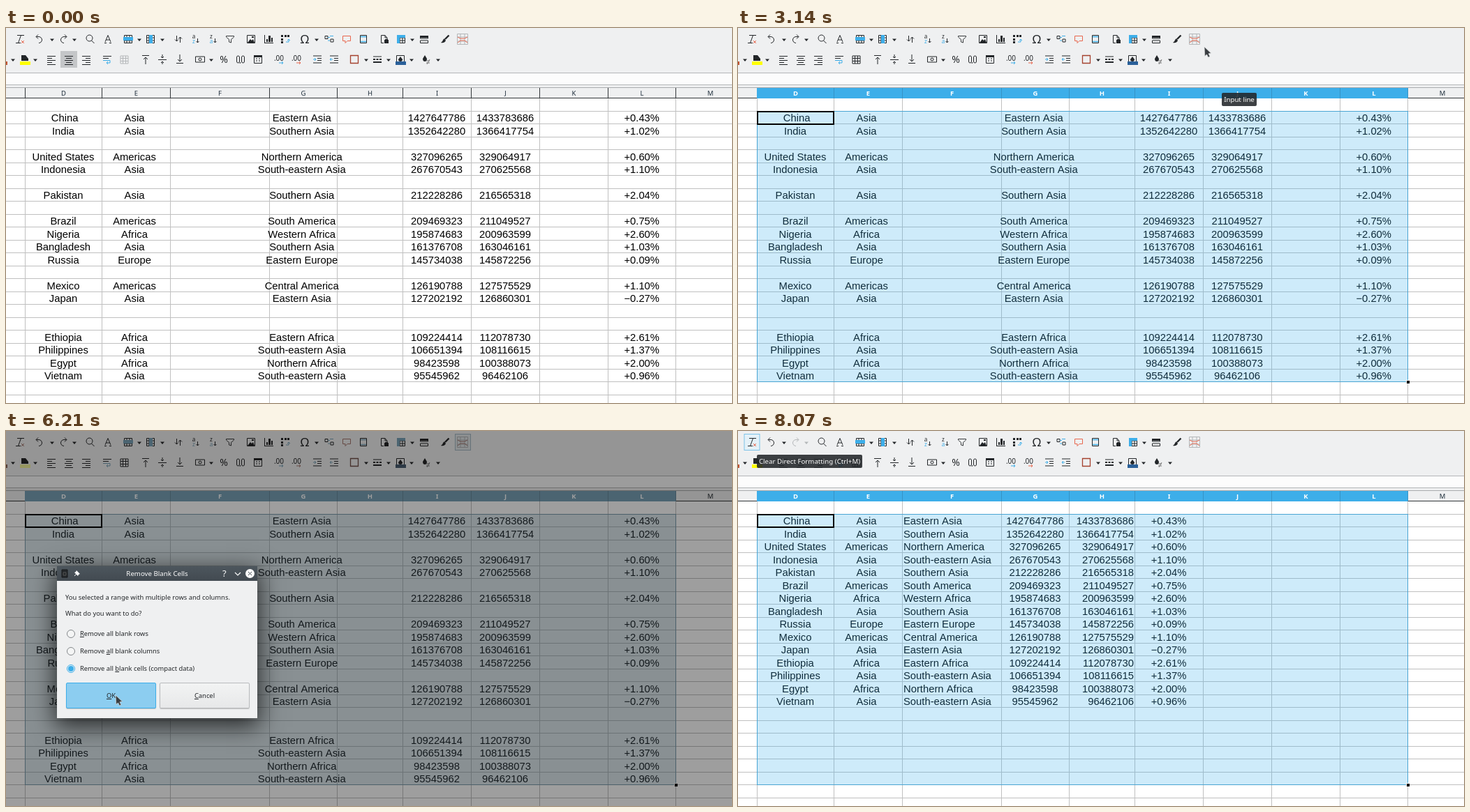
Recreate the animation shown at these times as an HTML page with a canvas. Size 1040x538 px, loop 8.14 s.

```html
<!DOCTYPE html>
<html lang="en">
<meta charset="utf-8">
<title>Remove blank cells</title>
<style>
  html, body { margin: 0; width: 100%; height: 100%; overflow: hidden; background: #fff; }
  body { position: relative; font: 9.37px/16px "Noto Sans", sans-serif; color: #232629; }
  body > *, #dialog > * { position: absolute; white-space: nowrap; }
  canvas { left: 0; top: 0; display: block; }
  u { text-decoration-thickness: 1px; text-underline-offset: 1px; }
  #dialog { left: 73px; top: 194px; width: 287px; height: 218px; background: #eff0f1;
    box-shadow: 0 9px 32px 3px rgba(0, 0, 0, .7); }
  #title { left: 0; top: 0; width: 287px; height: 21px; line-height: 21px; text-align: center;
    font-size: 9.7px; color: #fcfcfc; background: linear-gradient(#4d565d, #424a51); }
  #title svg { position: absolute; left: 0; top: 0; }
  .text { left: 12px; }
  .radio { left: 14px; width: 10px; height: 10px; border: 1px solid #85898c; border-radius: 50%; background: #f4f5f5; }
  .radio i { position: absolute; inset: 1px; border-radius: 50%; background: #3daee9; }
  .label { left: 33px; }
  .focus { left: 33px; height: 1px; background: #85898c; }
  .button { top: 167px; width: 127px; height: 35px; line-height: 36px; text-align: center; border: 1px solid #b9bbbd;
    border-radius: 2px; background: linear-gradient(#f2f3f3, #e7e8e9); box-shadow: 0 1px 1px rgba(0, 0, 0, .2); }
  .tip { height: 19px; line-height: 19px; font-size: 9.7px; text-align: center; color: #fcfcfc;
    background: rgba(35, 38, 41, .88); border-radius: 2px; }
</style>
<canvas id="sheet" width="1040" height="538"></canvas>
<div id="dialog">
  <div id="title">Remove Blank Cells
    <svg width="287" height="21" fill="none" stroke="#fcfcfc">
      <path d="M7 5H15V16H7Z" fill="#24282b" stroke="#16191b"/><path d="M9 9H13V13H9Z" stroke="#555"/>
      <path d="M25 14L28 11" /><path d="M28 6L33 11L31 12L30 14L25 9L27 8Z" fill="#fcfcfc" stroke="none"/>
      <path d="M255 9L259 13L263 9" stroke-width="1.2"/>
      <circle cx="276.500" cy="10.500" r="6.500" fill="#fcfcfc" stroke="none"/>
      <path d="M274 8L279 13M279 8L274 13" stroke="#424a51"/>
      <text x="237" y="15" font-size="13" fill="#fcfcfc" stroke="none">?</text>
    </svg>
  </div>
  <div class="text" style="top:37px">You selected a range with multiple rows and columns.</div>
  <div class="text" style="top:60px">What do you want to do?</div>
  <div class="radio" style="top:91px"><i></i></div>
  <div class="radio" style="top:116px"></div>
  <div class="radio" style="top:141px"><i></i></div>
  <div class="label" style="top:89px"><u>R</u>emove all blank rows</div>
  <div class="label" style="top:114px">Remove <u>a</u>ll blank columns</div>
  <div class="label" style="top:139px">Remove all <u>b</u>lank cells (compact data)</div>
  <div class="focus" style="top:107px;width:236px"></div>
  <div class="focus" style="top:157px;width:243px"></div>
  <div class="button" id="ok" style="left:13px"><u>O</u>K</div>
  <div class="button" style="left:147px"><u>C</u>ancel</div>
</div>
<div class="tip" style="left:693px;top:93px;width:50px">Input line</div>
<div class="tip" style="left:667px;top:34px;width:95px">Remove Blank Cells</div>
<div class="tip" style="left:27px;top:34px;width:151px">Clear Direct Formatting (Ctrl+M)</div>
<svg id="cursor" width="16" height="20" viewBox="-2 -2 16 20" style="left:-2px;top:-2px">
  <path d="M0 0L9.500 9L6 9.800L8 14L5.500 15L3.600 11L.8 13.200Z" fill="#3a3e42" stroke="#d9dbdc" stroke-width=".7"/>
</svg>
<script>
const LOOP = 8140, FPS = 14;
const INK = '#232629', BLUE = '#3daee9', RED = '#e8664d', GRAY = '#b4b7b9';
const COLS = [27, 137, 235, 377, 474, 568, 666, 764, 862, 959];
const FIRST_ROW = 119, PITCH = 18.5;
const rowLine = i => Math.floor(FIRST_ROW + i * PITCH);

// Blank lines are the empty rows of the sheet.
const rows = `\u00a0China|Asia|Eastern Asia|1427647786|1433783686|+0.43%
India|Asia|Southern Asia|1352642280|1366417754|+1.02%

United States|Americas|Northern America|327096265|329064917|+0.60%
Indonesia|Asia|South-eastern Asia|267670543|270625568|+1.10%

Pakistan|Asia|Southern Asia|212228286|216565318|+2.04%

Brazil|Americas|South America|209469323|211049527|+0.75%
Nigeria|Africa|Western Africa|195874683|200963599|+2.60%
Bangladesh|Asia|Southern Asia|161376708|163046161|+1.03%
Russia|Europe|Eastern Europe|145734038|145872256|+0.09%

Mexico|Americas|Central America|126190788|127575529|+1.10%
Japan|Asia|Eastern Asia|127202192|126860301|−0.27%


Ethiopia|Africa|Eastern Africa|109224414|112078730|+2.61%
Philippines|Asia|South-eastern Asia|106651394|108116615|+1.37%
Egypt|Africa|Northern Africa|98423598|100388073|+2.00%
Vietnam|Asia|South-eastern Asia|95545962|96462106|+0.96%`.split('\n');
const compactRows = rows.filter(Boolean);

// Keys are [frame, ...values].
const cursorKeys = [[7, 17, 128], [10, 33, 128], [12, 33, 128], [24, 891, 455], [29, 891, 455], [32, 924, 491],
  [33, 924, 491], [44, 668, 27], [45, 657, 16], [52, 657, 16], [57, 311, 305], [62, 255, 357], [67, 157, 335],
  [68, 157, 335], [69, 161, 338], [74, 161, 338], [75, 165, 354], [76, 165, 354], [77, 157, 369], [79, 157, 369],
  [80, 157, 379], [93, 157, 379], [100, 169, 415], [110, 20, -20]];
const dimKeys = [[50, 0], [52, .6], [54, 1], [88, 1], [91, .4], [94, 0]];
const dialogKeys = [[49, 0], [51, 1], [88, 1], [91, .25], [92, 0]];
const choiceKeys = [[70, 0], [73, 1]];
const tipKeys = [
  [[43, 0], [44, 1], [45, 1], [47, 0]],
  [[47, 0], [48, 1], [50, 1], [52, .12], [53, 0]],
  [[112, 0], [113, 1]],
];

function at(keys, n) {
  const i = keys.findIndex(k => k[0] > n);
  if (i < 0) return keys.at(-1).slice(1);
  if (i === 0) return keys[0].slice(1);
  const [a, b] = [keys[i - 1], keys[i]], f = (n - a[0]) / (b[0] - a[0]);
  return a.slice(1).map((v, j) => v + (b[j + 1] - v) * f);
}

const $ = id => document.getElementById(id);
const all = selector => [...document.querySelectorAll(selector)];
const ctx = $('sheet').getContext('2d');

function rect(x, y, w, h, color) { ctx.fillStyle = color; ctx.fillRect(x, y, w, h); }

function draw(x, y, path, color = INK, width = 1) {
  ctx.save();
  ctx.translate(x, y);
  ctx.strokeStyle = ctx.fillStyle = color;
  ctx.lineWidth = width;
  width ? ctx.stroke(new Path2D(path)) : ctx.fill(new Path2D(path));
  ctx.restore();
}
const solid = (x, y, path, color) => draw(x, y, path, color, 0);

function write(text, x, y, font, color = INK, align = 'center') {
  ctx.font = font;
  ctx.fillStyle = color;
  ctx.textAlign = align;
  ctx.fillText(text, x, y);
}
const sans = (size, weight = 400) => `${weight} ${size}px "Noto Sans", sans-serif`;

function table(x, y, color = INK) {
  draw(x, y, 'M-5.500-5.500H5.500V5.500H-5.500ZM-5.500-2H5.500M-5.500 2H5.500M-2 -5.500V5.500M2-5.500V5.500', color, 1);
}

function button(x, y, fillColor, edge) {
  rect(x - 11.5, y - 12, 23, 24, edge);
  rect(x - 10.5, y - 11, 21, 22, fillColor);
}

function lines(x, y, lefts, w, color = INK) {
  lefts.forEach((left, i) => rect(x + left, y - 6 + i * 3, i % 2 ? w : 12, 1, color));
}

function topIcons(n) {
  const y = 16;
  if (n >= 109) button(20, y, '#e4f1f8', '#7cc3e8');
  if (n >= 45 && n < 94) button(654.5, y, '#dbe8ef', '#86bfdd');
  draw(20, y, 'M-4-5.500H6M1.500-5.500L-2.500 5.500M-6 5.500H1');
  draw(20, y, 'M2 2L6 6M6 2L2 6', RED);
  draw(48, y, 'M-1 5.500A4.500 4.500 0 1 0 -1-3.500H-4.500M-2-6.500L-5-3.500L-2-.5');
  draw(82, y, 'M1 5.500A4.500 4.500 0 1 1 1-3.500H4.500M2-6.500L5-3.500L2-.5', n < 89 ? INK : GRAY);
  for (const x of [66, 98, 191, 224, 445, 582])
    solid(x, 17, 'M-3-1.500H3L0 2Z', x === 98 && n >= 89 ? GRAY : INK);
  draw(120, y, 'M4-1.500A4.500 4.500 0 1 1-5-1.500A4.500 4.500 0 1 1 4-1.500M2.500 2L6.500 6');
  draw(146, y, 'M-4 4L0-5.500L4 4M-2.500 1H2.500M-5 5.500H-2M2 5.500H5');
  table(175, y); rect(168, 13, 14, 5, BLUE);
  table(207, y); rect(205, 10, 5, 12, BLUE);
  draw(247, y, 'M-2.500-5V3M-5 .5L-2.500 3L0 .5M2.500 5V-3M0-.5L2.500-3L5-.5');
  for (const [x, first, second] of [[271, 'a', 'z'], [296, 'z', 'a']]) {
    write(first, x - 2, 15, sans(8), INK);
    write(second, x - 2, 22, sans(8), BLUE);
    draw(x + 3.5, y, 'M0-1V5M-2 3L0 5L2 3');
  }
  draw(321, y, 'M-5.500-4.500H5.500V-3L1.500 .5V5L-1.500 4V.5L-5.500-3Z', INK, .9);
  draw(351, y, 'M-5.500-5.500H5.500V5.500H-5.500Z');
  solid(351, y, 'M-5 5L-1 0L1 2L3 0L5 5ZM1-4H4V-2H1Z');
  solid(376, y, 'M-6-6H-5V5H7V6H-6ZM-3 0H-1V4H-3ZM0-5H3V4H0ZM4-2H6V4H4Z');
  solid(400, y, 'M-6-6H-3V-3H-6ZM-1-6H2V-3H-1ZM3-6H6V-3H3ZM-6-1H-3V2H-6ZM-6 3H-3V6H-6Z');
  draw(401, y, 'M0 4H4V0M2 2L4 0L6 2', BLUE);
  write('Ω', 428, 22, sans(17, 500));
  draw(463, y, 'M-2-4.500H-6V-.5H-2ZM2 0H6V4H2Z');
  draw(463, y, 'M-2-2.500H1M1 2H-2M1-4.500H6', BLUE);
  draw(488, y, 'M-5.500-4.500H5.500V2.500H1L-2 5.500V2.500H-5.500Z', RED);
  draw(512, y, 'M-4.500-5.500H4.500V5.500H-4.500Z');
  draw(512, y, 'M-4-3.500H4M-4 3.500H4', BLUE, 1.5);
  draw(542, y, 'M4 0V-2L1-5.500H-4.500V5.500H-1M1-5.500V-2H4');
  solid(542, y, 'M0 1H6V6H0ZM1 0H5V1H1Z');
  table(566, y); rect(560, 10, 12, 4, BLUE); rect(560, 14, 4, 8, BLUE);
  draw(599, y, 'M-5.500-4.500H5.500V-1H-5.500ZM-5.500 2H5.500V5.500H-5.500Z');
  solid(599, y, 'M-6-5H6V-2H-6Z');
  draw(629, y, 'M5.500-5.500L0 0', INK, 2.4);
  solid(629, y, 'M-1-1L1 2Q-1 6-6 5Q-3 3-3 1Z');
  draw(654, y, 'M-7.500-7.500H7.500V7.500H-7.500ZM-7.500-3H7.500M-7.500 3H7.500M-3-7.500V7.500M3-7.500V7.500', GRAY, 1);
  draw(654, y, 'M-7-3L-3-1H3L7-3M-7 5L-3 2H3L7 5', RED);
}

function lowerIcons(n) {
  const y = 45;
  rect(0, 48, 2, 5, '#c0532f');
  solid(27, y, 'M-5-6H1L5-1V2H-5Z');
  rect(20, 48, 15, 5, '#ffff00');
  for (const x of [10, 42, 294, 516, 548, 581, 619]) solid(x, 46, 'M-3-1.500H3L0 2Z');
  if (n < 32) rect(78, 33, 24, 24, '#c4c6c8');
  lines(65, 46, [-6, -6, -6, -6, -6], 7);
  lines(90, 46, [-6, -4, -6, -4, -6], 8);
  lines(115, 46, [-6, -1, -6, -1, -6], 7);
  lines(145, 46, [-6, -6], 8);
  draw(145, y, 'M-6 1.500H4V5H-1M1 3L-1 5L1 7', BLUE);
  table(169.5, 45.5, n < 32 ? GRAY : INK);
  draw(200, y, 'M-5-5.500H5M0 7V-3M-3 0L0-3L3 0');
  draw(224, y, 'M-6 .5H6M0-7V-2M-2-4L0-2L2-4M0 7V3M-2 5L0 3L2 5');
  draw(249, y, 'M-5 5.500H5M0-7V3M-3 0L0 3L3 0');
  draw(278, y, 'M-6.500-4H6.500V4H-6.500ZM2 0A2 2 0 1 1-2 0A2 2 0 1 1 2 0');
  write('%', 312, 50, sans(14));
  draw(336, y, 'M-5.500-3A2 2 0 0 1-1.500-3V3A2 2 0 0 1-5.500 3ZM1.500-3A2 2 0 0 1 5.500-3V3A2 2 0 0 1 1.500 3ZM0 4L-1 6');
  draw(361, y, 'M-5.500-5H5.500V5.500H-5.500ZM-3-1H-1M1-1H3M-3 2H-1M1 2H3');
  rect(355, 39, 12, 3, INK);
  for (const [x, color] of [[391, BLUE], [416, RED]]) {
    write('.00', x, 47, sans(10));
    draw(x + 3, 50, 'M-3 0H3M1-2L3 0L1 2', color);
  }
  for (const [x, arrow] of [[446, 'M-6 0H-2M-4-2L-2 0L-4 2'], [470, 'M-2 0H-6M-4-2L-6 0L-4 2']]) {
    draw(x, y, 'M-6-5H6M0-1.500H6M0 1.500H6M-6 5H6');
    draw(x, y, arrow, BLUE);
  }
  draw(499, y, 'M-5.500-5.500H5.500V5.500H-5.500Z', '#a5422f', 1.3);
  draw(532, y, 'M-6-4H6');
  draw(532, y, 'M-6 0H-3M-1.500 0H1.500M3 0H6', INK, 2);
  draw(532, y, 'M-6 4H6', INK, 2);
  draw(565, y, 'M-5.500 3V-5.500H5.500V3');
  solid(565, y, 'M0-4L3 0Q3 3 0 3Q-3 3-3 0Z');
  rect(558, 48, 15, 5, '#2a6099');
  solid(601, y, 'M-1-6L2-1Q2 3-1 3Q-4 3-4-1Z');
  draw(604, 48, 'M-2-1H3M-2 2H3M3-3L-1 4', '#777');
}

function selection(n) {
  if (n < 12) return null;
  const [x, y] = at(cursorKeys, n - .3);
  if (n >= 30) return { col: 9, row: Math.min(20, n - 12) };
  return {
    col: COLS.filter(c => c <= Math.max(x, 30)).length,
    row: Math.min(17, Math.max(0, Math.floor((y - FIRST_ROW) / PITCH))),
  };
}

function headers(sel) {
  rect(0, 82, 1040, 19, '#eff0f1');
  rect(0, 85, 1040, 1, '#a9abad');
  rect(0, 100, 1040, 1, '#33373a');
  for (const x of COLS) rect(x, 86, 1, 15, '#33373a');
  if (sel) rect(27, 86, COLS[sel.col] - 26, 15, BLUE);
  [...'DEFGHIJKLM'].forEach((name, i) => {
    const on = sel && i < sel.col, right = COLS[i + 1] ?? 1058;
    if (on) rect(right, 86, 1, 15, '#3593c6');
    write(name, (COLS[i] + right) / 2 + .5, 97, sans(9.5, on ? 700 : 400), on ? '#fff' : '#1d2c3a');
  });
}

function cells(compact) {
  const cell = '14.8px "Liberation Sans", Arial, sans-serif';
  for (let i = 0; rowLine(i) < 538; i++) rect(0, rowLine(i), 1040, 1, '#c0c0c0');
  for (const x of COLS) rect(x, 101, 1, 437, '#c0c0c0');
  const spots = compact ? [82, 184, 237, 425.5, 567, 617] : [82, 184, 423.7, 617, 715, 910.7];
  (compact ? compactRows : rows).forEach((row, i) => row && row.split('|').forEach((text, c) => {
    const align = compact && c === 2 ? 'left' : compact && c === 4 ? 'right' : 'center';
    write(text, spots[c], 134.2 + i * PITCH, cell, '#000', align);
  }));
}

function drawSelection({ col, row }) {
  const [left, top] = [COLS[0], FIRST_ROW], right = COLS[col], bottom = rowLine(row + 1);
  rect(left, top, right - left + 1, bottom - top + 1, 'rgba(61,174,233,.25)');
  ctx.lineWidth = 1;
  ctx.strokeStyle = '#4aa5d3';
  ctx.strokeRect(left + .5, top + .5, right - left, bottom - top);
  ctx.lineWidth = 2;
  ctx.strokeStyle = '#000';
  ctx.strokeRect(left + 1, top + 1, 109, 18);
  rect(right - 2, bottom - 2, 5, 5, '#fff');
  rect(right - 1, bottom - 1, 4, 4, '#000');
}

function drawSheet(n) {
  const sel = selection(n);
  rect(0, 0, 1040, 538, '#fff');
  rect(0, 0, 1040, 82, '#eff0f1');
  rect(0, 64, 1040, 1, '#b4b6b8');
  rect(0, 65, 1040, 16, '#fcfcfc');
  rect(0, 81, 1040, 1, '#b4b6b8');
  topIcons(n);
  lowerIcons(n);
  cells(n >= 89);
  headers(sel);
  if (sel) drawSelection(sel);
}

function drawDialog(n, cursorY) {
  const [choice] = at(choiceKeys, n), hoverable = n >= 57 && n < 88;
  $('dialog').style.opacity = at(dialogKeys, n)[0];
  const amounts = [1 - choice, 0, choice];
  all('.radio').forEach((radio, i) => {
    const hover = hoverable && Math.abs(cursorY - 291 - i * 25) < 12;
    radio.style.borderColor = amounts[i] > .5 ? BLUE : hover ? '#8fcdee' : '#85898c';
  });
  const [firstDot, lastDot] = all('.radio i'), [firstLine, lastLine] = all('.focus');
  firstDot.style.opacity = firstLine.style.opacity = 1 - choice;
  lastDot.style.opacity = choice;
  lastLine.style.opacity = n < 86 ? choice : 0;
  $('ok').style.borderColor = n >= 77 ? BLUE : '';
  $('ok').style.background = n >= 86 ? '#8ccdf0' : '';
}

let shown = -1;
function tick() {
  // The 5 ms covers frame times rounded down to 10 ms.
  const n = Math.floor((performance.now() % LOOP + 5) * FPS / 1000) % Math.round(LOOP * FPS / 1000);
  if (n !== shown) {
    shown = n;
    const [x, y] = at(cursorKeys, n), [dim] = at(dimKeys, n);
    drawSheet(n);
    drawDialog(n, y);
    $('sheet').style.filter = dim ? `saturate(${1 - .65 * dim}) brightness(${1 - .38 * dim})` : 'none';
    all('.tip').forEach((tip, i) => tip.style.opacity = at(tipKeys[i], n)[0]);
    $('cursor').style.transform = `translate(${x}px, ${y}px)`;
    $('cursor').style.visibility = n >= 7 && n < 110 ? 'visible' : 'hidden';
  }
  requestAnimationFrame(tick);
}
requestAnimationFrame(tick);
</script>
</html>
```
